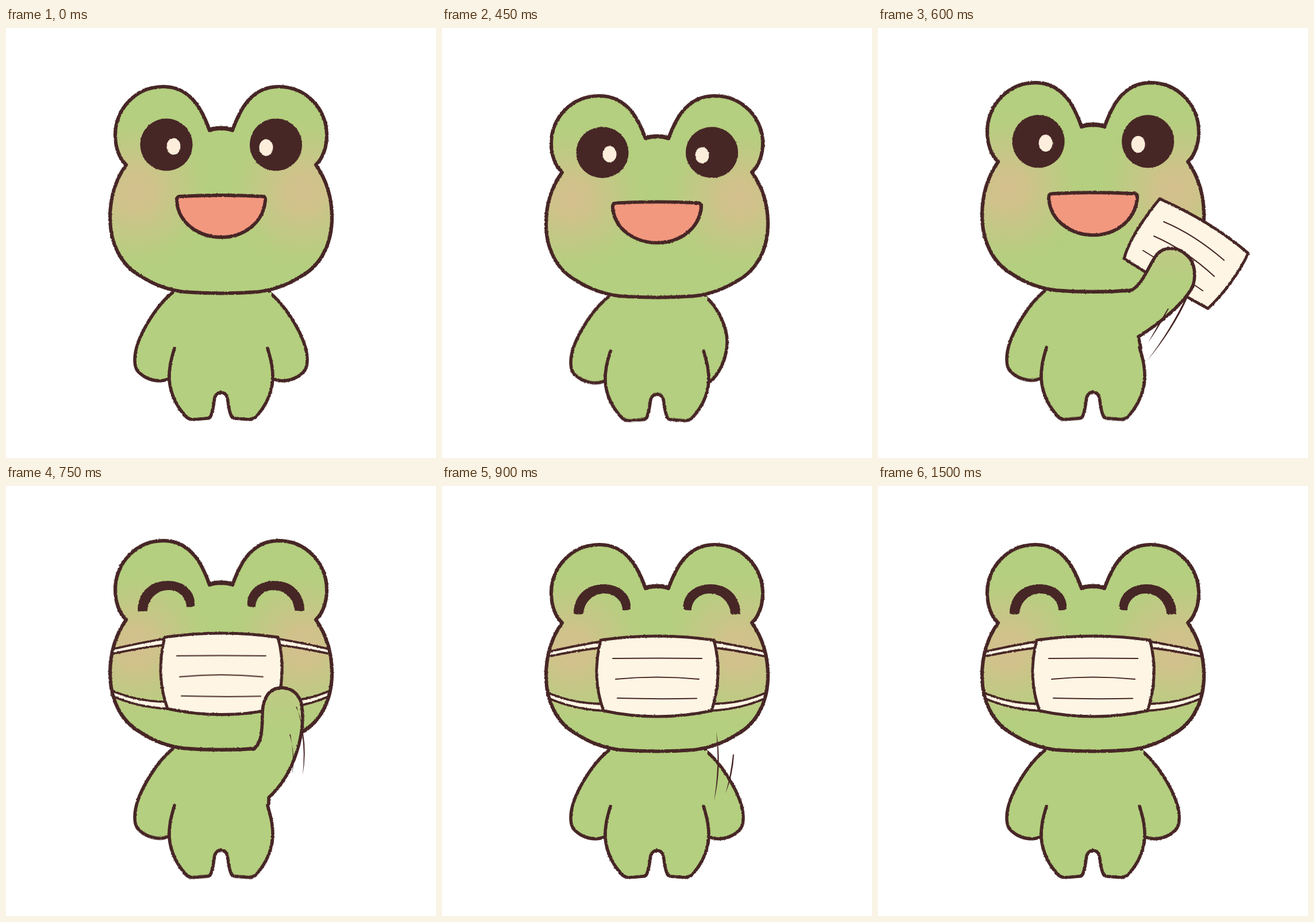
An HTML page that plays this animation: 748x748 px, repeating every 1.8 s.

```html
<!DOCTYPE html>
<html lang="en">
<head>
<meta charset="utf-8">
<title>Frog puts on a mask</title>
<style>
  html, body { margin: 0; width: 100%; height: 100%; overflow: hidden; background: #fff; }
  svg { display: block; width: 100%; height: 100%; }

  .ink { fill: none; stroke: #472626; stroke-width: 5.6; stroke-linecap: round; stroke-linejoin: round; }
  .skin { fill: #b4cf7f; }
  .dark { fill: #472626; }
  .cloth { fill: #fef5e4; }
  .thin { stroke-width: 2; }
  .mid { stroke-width: 3.8; }

  .squash, .open, .happy, .rest, .back, .wave, .touch, .swish {
    animation: 1800ms step-end infinite;
  }
  .squash { animation-name: squash; }
  .open { animation-name: open; }
  .happy { animation-name: happy; }
  .rest { animation-name: rest; }
  .back { animation-name: back; }
  .wave { animation-name: wave; }
  .touch { animation-name: touch; }
  .swish { animation-name: swish; }

  @keyframes squash {
    0%, 50%, 100% { transform: matrix(1, 0, 0, 1, 0, 0); }
    25% { transform: matrix(1, 0, 0, .976, 0, 18.4); }
    33.3333% { transform: matrix(1, 0, 0, 1.012, 0, -8.2); }
  }
  @keyframes open {
    0% { visibility: visible; }
    41.6667%, 100% { visibility: hidden; }
  }
  @keyframes happy {
    0% { visibility: hidden; }
    41.6667%, 100% { visibility: visible; }
  }
  @keyframes rest {
    0%, 50%, 100% { visibility: visible; }
    25% { visibility: hidden; }
  }
  @keyframes back {
    0%, 33.3333%, 100% { visibility: hidden; }
    25% { visibility: visible; }
  }
  @keyframes wave {
    0%, 41.6667%, 100% { visibility: hidden; }
    33.3333% { visibility: visible; }
  }
  @keyframes touch {
    0%, 50%, 100% { visibility: hidden; }
    41.6667% { visibility: visible; }
  }
  @keyframes swish {
    0%, 58.3333%, 100% { visibility: hidden; }
    50% { visibility: visible; }
  }
</style>
</head>
<body>
<svg viewBox="0 0 748 748">
  <defs>
    <!-- crayon-like edge -->
    <filter id="rough" filterUnits="userSpaceOnUse" x="0" y="0" width="748" height="748" color-interpolation-filters="sRGB">
      <feTurbulence type="fractalNoise" baseFrequency=".3" numOctaves="2" seed="4"/>
      <feDisplacementMap in="SourceGraphic" scale="2.6" xChannelSelector="R" yChannelSelector="G"/>
    </filter>
    <radialGradient id="blush">
      <stop offset="0" stop-color="#d4c08d"/>
      <stop offset=".22" stop-color="#d2c18c" stop-opacity=".95"/>
      <stop offset=".62" stop-color="#c6c786" stop-opacity=".6"/>
      <stop offset="1" stop-color="#b4cf7f" stop-opacity="0"/>
    </radialGradient>
    <linearGradient id="sleeve" x2="0" y2="1">
      <stop offset="0" stop-color="#bfca84"/>
      <stop offset=".36" stop-color="#b4cf7f"/>
    </linearGradient>
    <path id="head" d="M354 178C344 150 325 102 274 102C225 102 190 142 190 186C190 206 196 226 209 238
      C192 262 181 294 181 330C181 372 198 412 235 432C258 447 285 456 310 459Q374 464 438 459
      C463 456 490 447 513 432C550 412 567 372 567 330C567 294 556 262 539 238
      C552 226 558 206 558 186C558 142 523 102 474 102C423 102 404 150 394 178Q374 170 354 178Z"/>
    <clipPath id="face"><use href="#head"/></clipPath>
    <path id="arm" d="M290 460C262 482 224 540 224 577C224 595 230 599 240 606C253 614 270 616 281 611"/>
    <path id="leg" d="M293 557C288 575 283 590 284 612C286 635 296 657 312 675Q317 681 326 681L350 679
      Q355 679 357 673C361 662 362 648 363 643Q366 634 374 634"/>
    <path id="smile" class="dark" d="M229 222C229 192 250 171 281 171C310 171 330 190 328 213Q326 217 314 216
      C314 200 300 187 283 187C262 187 247 203 246 222Q238 225 229 222Z"/>
    <g id="straps" class="cloth">
      <path d="M183 289Q230 278 276 270.5L273 281.5Q230 287 183 297Z"/>
      <path d="M183 359Q225 378 278 379L281 391Q226 388 183 368Z"/>
      <path class="ink mid" d="M183 289Q230 278 276 270.5M183 297Q230 287 273 281.5M183 359Q225 378 278 379M183 368Q226 388 281 391"/>
    </g>
  </defs>

  <g filter="url(#rough)">
    <g class="squash">
      <!-- right arm, lowered -->
      <g class="rest">
        <path class="skin" d="M440 462H458C486 482 524 540 524 577C524 595 518 599 508 606C495 614 478 616 467 611H440Z"/>
        <use href="#arm" class="ink" transform="matrix(-1 0 0 1 748 0)"/>
      </g>
      <g class="back">
        <path class="skin" d="M440 462H458C480 478 496 515 496 540C496 570 482 598 467 611H440Z"/>
        <path class="ink" d="M458 460C480 478 496 515 496 540C496 570 482 598 467 611"/>
      </g>

      <!-- torso and left arm -->
      <path class="skin" d="M290 460C262 482 224 540 224 577C224 595 230 599 240 606C253 614 270 616 281 611L284 612
        C286 635 296 657 312 675Q317 681 326 681L350 679Q355 679 357 673C361 662 362 648 363 643Q366 634 374 634
        Q382 634 385 643C386 648 387 662 391 673Q393 679 398 679L422 681Q431 681 436 675C452 657 462 635 464 612
        C465 590 460 575 455 557L454 530L462 460Z"/>
      <g class="ink">
        <use href="#arm"/>
        <use href="#leg"/>
        <use href="#leg" transform="matrix(-1 0 0 1 748 0)"/>
      </g>

      <!-- head -->
      <use href="#head" class="skin"/>
      <g clip-path="url(#face)">
        <circle cx="226" cy="285" r="142" fill="url(#blush)"/>
        <circle cx="517" cy="285" r="142" fill="url(#blush)"/>
        <g class="happy">
          <use href="#straps"/>
          <use href="#straps" transform="matrix(-1 0 0 1 748 0)"/>
        </g>
      </g>
      <use href="#head" class="ink" style="stroke-width:6.2"/>
      <path class="ink" style="stroke-width:7.5" d="M356 176.5Q374 172 392 176.5"/>

      <g class="open">
        <circle class="dark" cx="279" cy="203" r="45.5"/>
        <circle class="dark" cx="469.5" cy="203" r="45.5"/>
        <ellipse cx="291.5" cy="206" rx="12" ry="14.5" fill="#fdeedb"/>
        <ellipse cx="452.5" cy="208" rx="12" ry="14.5" fill="#fdeedb"/>
        <path class="ink" style="fill:#f2987f;stroke-width:6" d="M302 293Q374 289 447 293Q452 294 451 301
          C447 340 412 364 375 364C338 364 301 342 297 302Q296 294 302 293Z"/>
      </g>

      <g class="happy">
        <use href="#smile"/>
        <use href="#smile" transform="matrix(-1 0 0 1 748 0)"/>
        <path class="ink" style="fill:#fef5e4;stroke-width:5" d="M276 268Q374 254 473 268C484 308 482 350 469 391
          Q374 411 281 391C266 350 266 308 276 268Z"/>
      </g>
    </g>
  </g>

  <!-- pleats stay crisp -->
  <g class="squash">
    <path class="happy ink thin" d="M297 300Q374 299 452 300M302 336Q374 329 447 336M305 369Q374 371 443 369.5"/>
  </g>

  <!-- right arm, holding up the mask -->
  <g class="wave">
    <path class="ink" filter="url(#rough)" style="fill:#fef5e4;stroke-width:5" d="M490 297Q582 338 644 392Q618 446 574 488
      Q500 448 428 401Q440 358 490 297Z"/>
    <path class="ink thin" d="M497 337Q550 359 602 404M480 362Q535 386 585 432M461 387L482 400M546 444L565 457"/>
    <path class="ink" filter="url(#rough)" style="fill:url(#sleeve)" d="M437 458C462 448 470 412 486 393C500 378 525 382 538 396
      C552 408 553 432 548 448C534 478 490 514 453 537L457 556"/>
  </g>

  <!-- right arm, touching the cheek -->
  <g class="touch" filter="url(#rough)">
    <path class="ink" style="fill:url(#sleeve)" d="M430 458C445 450 446 420 446 395C447 368 458 351 480 351
      C500 351 513 366 515 385C520 430 503 500 457 542L457 553"/>
  </g>

  <!-- tapered speed lines -->
  <g class="dark">
    <path class="wave" d="M539 468Q514 524 468 579Q511 522 536 467ZM506 488Q488 522 470 547Q486 518 504 488Z"/>
    <path class="touch" d="M517 430Q523 466 516 503Q520 466 515 430ZM493 432Q504 466 498 501Q501 466 495 432Z
      M504 384Q513 400 515 419Q510 400 506 384Z"/>
    <path class="swish" d="M477 427Q488 486 473 549Q483 486 477 427ZM508 467Q506 504 493 535Q502 504 506 467Z"/>
  </g>
</svg>
</body>
</html>
```
